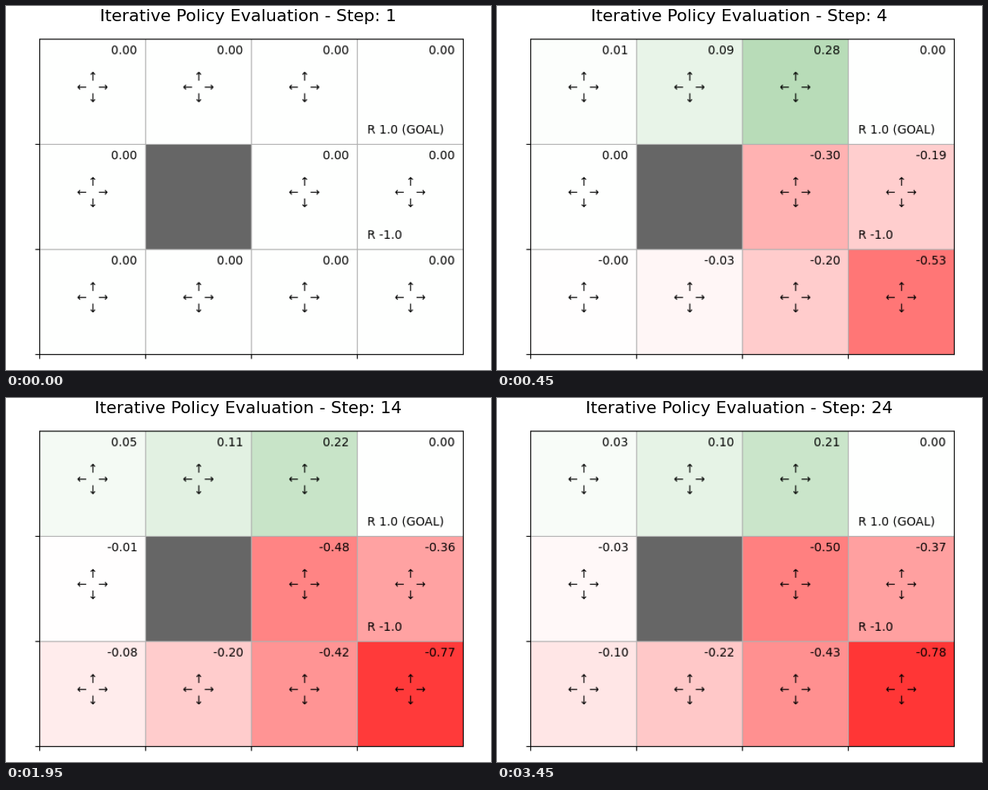
A matplotlib script for the animation above (3.6 s loop, 640 px wide and 480 px high).

```python
import numpy as np
import matplotlib.pyplot as plt
from matplotlib.animation import FuncAnimation
from matplotlib.colors import LinearSegmentedColormap

ROWS, COLS = 3, 4
GOAL, WALL, TRAP = (0, 3), (1, 1), (1, 3)
REWARDS = {GOAL: 1.0, TRAP: -1.0}
MOVES = [(-1, 0), (1, 0), (0, -1), (0, 1)]
GAMMA = 0.9
STEPS, INTERVAL = 24, 150

WIDTH, HEIGHT, DPI = 640, 480, 100
BOARD_W, BOARD_H = 496, 369.6
MARGIN = 10 + 3.5 / 72 * DPI  # padding plus tick length
CROP_W, CROP_H = int(BOARD_W + MARGIN + 10), int(BOARD_H + MARGIN + 10)

plt.rcParams["font.family"] = "DejaVu Sans"


def next_state(state, move):
    y, x = state[0] + move[0], state[1] + move[1]
    inside = 0 <= y < ROWS and 0 <= x < COLS
    return (y, x) if inside and (y, x) != WALL else state


def sweep(values):
    """One in-place evaluation pass of the uniform random policy."""
    values = values.copy()
    for state in np.ndindex(ROWS, COLS):
        if state in (GOAL, WALL):
            continue
        targets = [next_state(state, move) for move in MOVES]
        values[state] = sum(
            0.25 * (REWARDS.get(t, 0) + GAMMA * values[t]) for t in targets
        )
    return values


def build_board(fig):
    """Draw the grid world; return its colour mesh and value labels."""
    ax = fig.add_axes([MARGIN / WIDTH, MARGIN / HEIGHT,
                       BOARD_W / WIDTH, BOARD_H / HEIGHT])
    ax.set(xlim=(0, COLS), ylim=(0, ROWS),
           xticks=range(COLS), yticks=range(ROWS))
    ax.tick_params(labelbottom=False, labelleft=False)
    cmap = LinearSegmentedColormap.from_list("value", ["red", "white", "green"])
    mesh = ax.pcolormesh(np.zeros((ROWS, COLS)), cmap=cmap, vmin=-1, vmax=1)
    ax.grid(True)

    labels = {}
    for y, x in np.ndindex(ROWS, COLS):
        state, base = (y, x), ROWS - y
        if state == WALL:
            ax.add_patch(plt.Rectangle((x, base - 1), 1, 1, fc="0.4"))
            continue
        labels[state] = ax.text(x + 0.4, base - 0.15, "")
        if state in REWARDS:
            note = f"R {REWARDS[state]}" + (" (GOAL)" if state == GOAL else "")
            ax.text(x + 0.1, base - 0.9, note)
        if state != GOAL:
            for arrow, (dy, dx) in zip("↑↓←→", MOVES):
                ax.text(x + 0.45 + 0.1 * dx, base - 0.5 - 0.1 * dy, arrow)
    return mesh, labels


def render_boards(fig):
    """Rasterise the board after each sweep, cropped to its margins."""
    mesh, labels = build_board(fig)
    values = np.zeros((ROWS, COLS))
    boards = []
    for _ in range(STEPS):
        mesh.set_array(np.flipud(values))
        for state, label in labels.items():
            label.set_text(f"{values[state]:12.2f}")
        fig.canvas.draw()
        pixels = np.array(fig.canvas.buffer_rgba())
        boards.append(pixels[-CROP_H:, :CROP_W])
        values = sweep(values)
    return boards


fig = plt.figure(figsize=(WIDTH / DPI, HEIGHT / DPI), dpi=DPI)
boards = render_boards(fig)

# The stage shows the rendered board enlarged below the title.
fig.clear()
fig.set_layout_engine("constrained")
ax = fig.add_subplot()
ax.axis("off")
view = ax.imshow(boards[0])
title = fig.suptitle("", fontsize=16)


def draw(frame):
    view.set_data(boards[frame])
    title.set_text(f"Iterative Policy Evaluation - Step: {frame + 1}")
    return view, title


draw(0)
anim = FuncAnimation(fig, draw, frames=STEPS, interval=INTERVAL, repeat=True)
plt.show()
```
